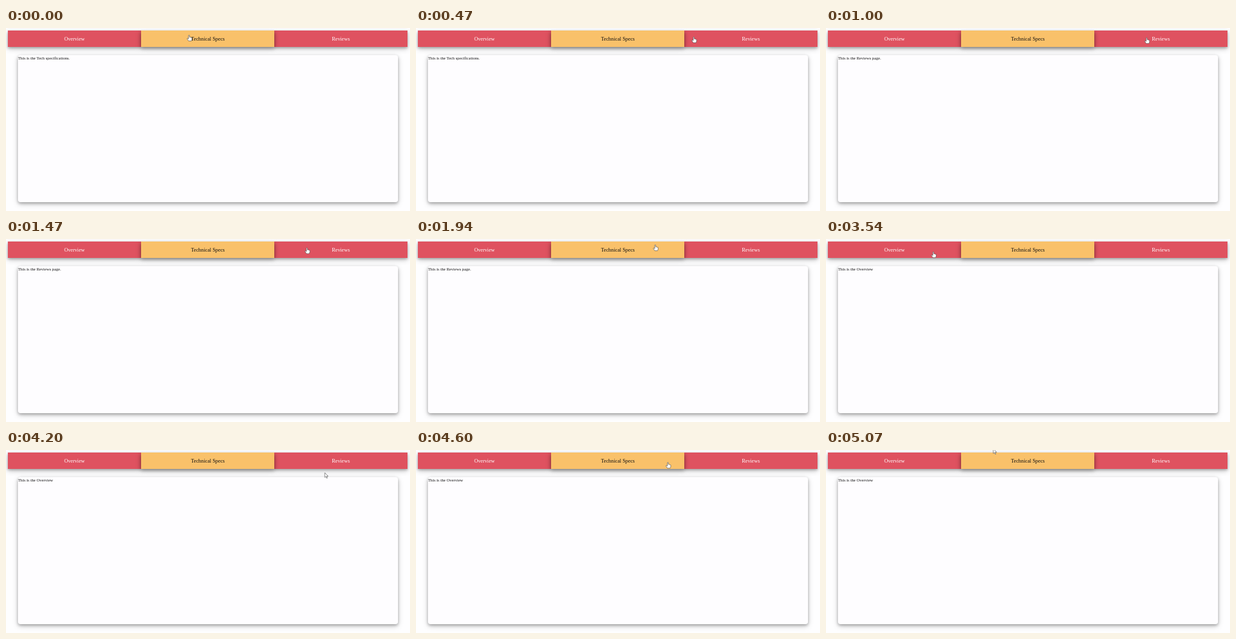
Write an HTML page that moves like this. It is 640 px wide and 290 px high and loops after 5140 ms.

```html
<!DOCTYPE html>
<html lang="en">
<head>
<meta charset="utf-8">
<title>Tabs</title>
<style>
  html, body { margin: 0; width: 100%; height: 100%; overflow: hidden; background: #fefeff; }
  body { position: relative; font-family: "Liberation Serif", "Times New Roman", serif; }
  div, svg { position: absolute; }
  .tab, #panel { box-shadow: 0 2px 4px rgba(0, 0, 0, .26), 0 3px 10px rgba(0, 0, 0, .2); }
  .tab {
    top: 3.5px; width: 211px; height: 26.5px; line-height: 28px;
    font-size: 8.3px; text-align: center; color: #fff; background: #df5260;
  }
  .tab.active {
    z-index: 1; color: #111; background: #f9c16a;
    box-shadow: 0 3px 5px rgba(0, 0, 0, .36), 0 3px 10px rgba(0, 0, 0, .24);
  }
  #panel {
    left: 19px; top: 43px; width: 602px; height: 233px; border-radius: 4px;
    font-size: 6.67px; line-height: 10px; color: #111; background: #fefdff;
  }
  svg { left: 0; top: 0; width: 640px; height: 290px; z-index: 2; }
  path { fill: #fff; stroke: #444; stroke-width: .6; stroke-linejoin: round; }
</style>
</head>
<body>
<div class="tab" style="left:3px">Overview</div>
<div class="tab active" style="left:214.3px">Technical Specs</div>
<div class="tab" style="left:425px">Reviews</div>
<div id="panel"></div>
<svg viewBox="0 0 640 290">
  <g id="cursor">
    <path id="hand" d="M-.8 .7Q0-.5 .8 .7V3.6Q1.6 3 2.2 3.9Q3 3.3 3.5 4.2Q4.5 3.9 4.6 5V7L3.6 9.6H-.7L-3 6.2Q-3.2 4.9-2 5.2L-.8 6.3Z"/>
    <path id="arrow" d="M0 0V7.5L1.8 5.9L3 8.7L4.2 8.2L3 5.5H5.3Z"/>
  </g>
</svg>
<script>
const LOOP = 5140;
const el = id => document.getElementById(id);

// Pointer stops: time, x, y
const stops = [
  [0, 290, 11], [750, 508, 15], [1250, 508, 15], [1940, 379, 9],
  [2250, 350, 14], [2740, 185, 27], [3200, 170, 20], [3600, 170, 20],
  [4200, 505, 36], [5070, 265, -2], [LOOP, 265, -2]
];
const pages = [
  [0, "This is the Tech specifications."],
  [870, "This is the Reviews page."],
  [2270, "This is the Tech specifications."],
  [3270, "This is the Overview"]
];

function pointer(t) {
  const i = stops.findIndex(s => s[0] > t);
  const [t0, x0, y0] = stops[i - 1], [t1, x1, y1] = stops[i];
  const u = (t - t0) / (t1 - t0), k = u * u * (3 - 2 * u);
  return [x0 + (x1 - x0) * k, y0 + (y1 - y0) * k];
}

function draw(t) {
  const [x, y] = pointer(t);
  const overTab = x >= 3 && x < 636 && y >= 3 && y < 30;
  el("cursor").setAttribute("transform", `translate(${x} ${y})`);
  el("hand").style.display = overTab ? "" : "none";
  el("arrow").style.display = overTab ? "none" : "";
  el("panel").textContent = pages.filter(p => p[0] <= t).pop()[1];
}

const start = performance.now();
function tick() {
  draw((performance.now() - start) % LOOP);
  requestAnimationFrame(tick);
}
tick();
</script>
</body>
</html>
```
